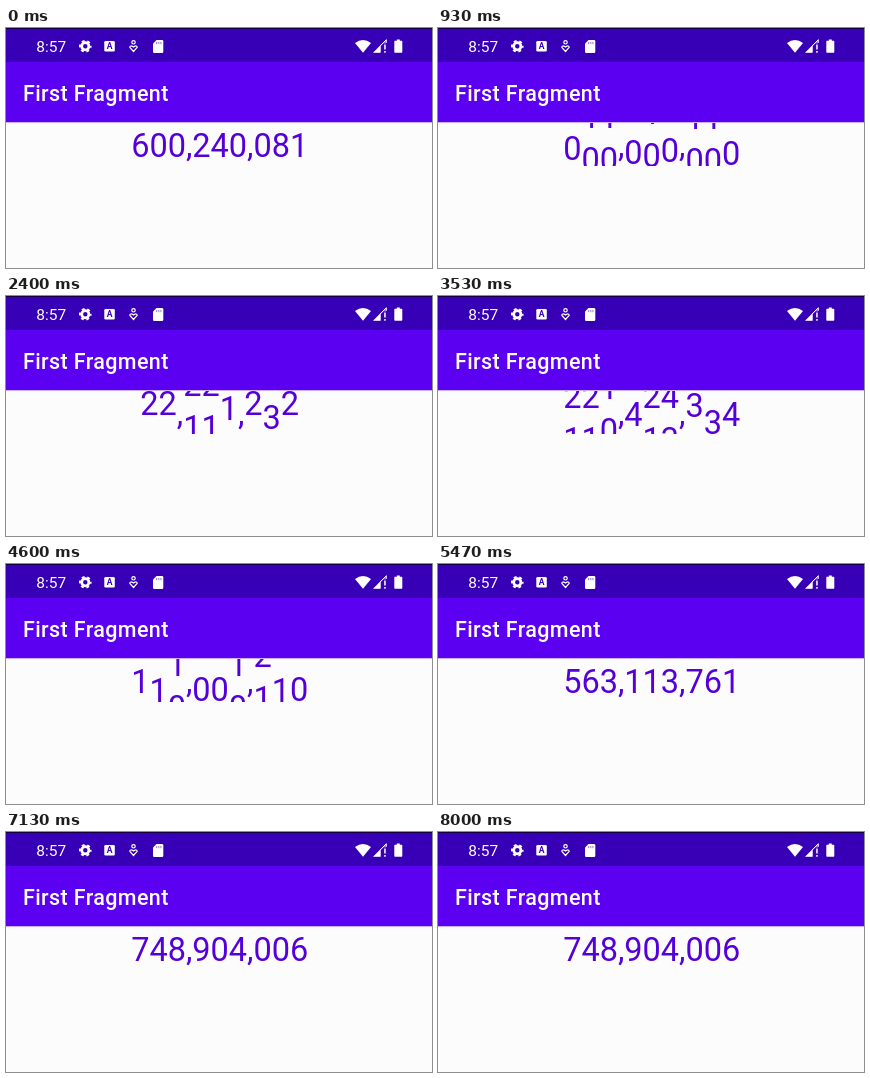
These frames come from a looping animation (426x240 px, 8.07 s). An HTML page:

```html
<!DOCTYPE html>
<html lang="en">
<head>
<meta charset="utf-8">
<title>Rolling number</title>
<style>
html, body { margin: 0; width: 100%; height: 100%; overflow: hidden; background: #fcfcfc; }
svg { display: block; width: 100vw; height: 100vh; font-family: Roboto, Arial, sans-serif; }
#number { font-size: 32.5px; fill: #5500d8; }
</style>
</head>
<body>
<svg viewBox="0 0 426 240">
  <defs><clipPath id="window"><rect x="100" y="95" width="226" height="43"/></clipPath></defs>
  <rect width="426" height="240" fill="#fcfcfc"/>
  <rect width="426" height="94.300" fill="#5c00f2"/>
  <rect width="426" height="34" fill="#3800b6"/>
  <rect width="426" height="1" fill="#14003c"/>
  <text x="17" y="73" font-size="21.5" font-weight="500" letter-spacing=".37" fill="#fff">First Fragment</text>

  <g fill="#fff">
    <text x="30.3" y="24" font-size="15.5">8:57</text>
    <!-- gear -->
    <g transform="translate(79.3 18.3)" fill="none" stroke="#fff">
      <circle r="3.6" stroke-width="2.700"/>
      <circle r="5.3" stroke-width="2" stroke-dasharray="2.8 2.75" stroke-dashoffset="1.400"/>
    </g>
    <!-- keyboard -->
    <rect x="98.300" y="13" width="10.500" height="10.500" rx="1.300"/>
    <text x="103.500" y="21.400" font-size="8.500" font-weight="700" text-anchor="middle" fill="#3800b6">A</text>
    <!-- location marker -->
    <g fill="none" stroke="#fff" stroke-width="1.200">
      <circle cx="127.500" cy="14.300" r="1.700"/>
      <path d="M127.500 23.500 123.800 19.300Q124 16.800 127.500 19 131 16.800 131.200 19.300z"/>
    </g>
    <!-- memory card -->
    <path d="M150.500 12h5.500q1.300 0 1.300 1.300v10.400q0 1.300-1.300 1.300h-7.700q-1.300 0-1.300-1.300v-8.200z"/>
    <path d="M150.700 14v2.200M152.800 14v2.200M154.900 14v2.200" stroke="#3800b6" stroke-opacity=".6" stroke-width=".9"/>
    <!-- wifi, signal, battery -->
    <path d="M349 15Q357 8.800 365 15L357 24.800z"/>
    <path d="M367.500 24.500 380 12V15.500H377.500L375 18V24.500z" opacity=".45"/>
    <path d="M367 24.800 374.500 17.300V24.800z"/>
    <path d="M374 18 380.300 11.700V14.800" fill="none" stroke="#fff" stroke-width="1"/>
    <path d="M378.200 16.500h1.500v5h-1.500zM378.200 23h1.500v1.700h-1.500z"/>
    <path d="M388.300 13.500q0-.8.8-.8h1.700v-1.300h3v1.300h1.700q.8 0 .8.8v10.500q0 .8-.8.8h-6.400q-.8 0-.8-.8z"/>
  </g>
  <g clip-path="url(#window)"><g id="number"></g></g>
</svg>
<script>
const LOOP = 8070, ROLL = 1000, ROW = 43, BASE = 128.8;
const DIGIT = 18.25, COMMA = 6.4, CENTER = 213.7;
const rolls = [
  [-ROLL, '600,240,081'],
  [803, '288,463,995'],
  [1938, '44,332,474'],
  [3094, '441,049,780'],
  [4305, '563,113,761'],
  [5746, '748,904,006']
];
const box = document.getElementById('number');
const glyph = (char, x, y) => `<text x="${x.toFixed(2)}" y="${y.toFixed(2)}">${char}</text>`;
const advance = char => char === ',' ? COMMA : DIGIT;

function render(time) {
  const [start, label] = rolls.findLast(([at]) => at <= time);
  const u = Math.min((time - start) / ROLL, 1);
  const progress = (1 - Math.cos(Math.PI * u)) / 2;
  const chars = [...label];
  let x = CENTER - chars.reduce((sum, char) => sum + advance(char), 0) / 2;
  let out = '';
  for (const char of chars) {
    if (char === ',') {
      out += glyph(char, x, BASE);
    } else {
      // Each wheel starts at zero; a final zero takes a full turn.
      const value = progress * (+char || 10);
      const low = Math.floor(value), shift = (value - low) * ROW;
      out += glyph(low % 10, x, BASE + shift);
      if (shift) out += glyph((low + 1) % 10, x, BASE + shift - ROW);
    }
    x += advance(char);
  }
  box.innerHTML = out;
}

const origin = performance.now();
function tick() {
  render((performance.now() - origin) % LOOP);
  requestAnimationFrame(tick);
}
tick();
</script>
</body>
</html>
```
